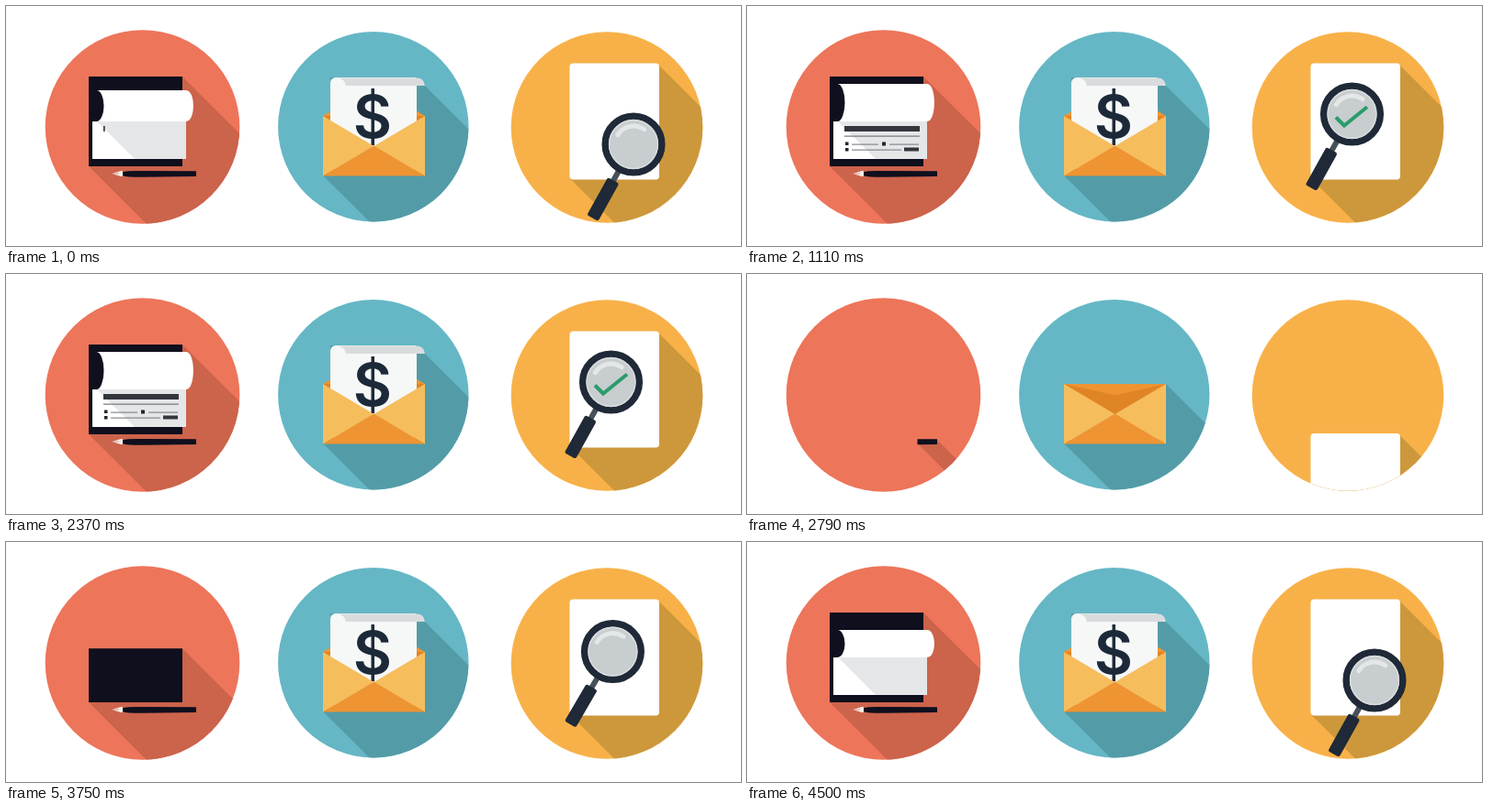
Recreate the animation shown at these times as an HTML page with a canvas. Size 800 by 262 pixels, loop 4.53 s.

```html
<!DOCTYPE html>
<html>
<head>
<meta charset="utf-8">
<style>
html, body { margin: 0; width: 100%; height: 100%; overflow: hidden; background: #fff; }
canvas { display: block; }
</style>
</head>
<body>
<canvas id="stage" width="800" height="262"></canvas>
<script>
const c = document.getElementById('stage').getContext('2d');
const LOOP = 4530, STEP = 30, START = 2580; // the build-up begins at START
const NAVY = '#1f2937', INK = '#0f0f1e';

const ramp = (t, a, b) => Math.min(1, Math.max(0, (t - a) / (b - a)));
const out = p => 1 - (1 - p) ** 2;
const inOut = p => p < .5 ? 4 * p ** 3 : 1 - 4 * (1 - p) ** 3;
const mix = (a, b, p) => a + (b - a) * p;

function rect(color, x, y, w, h, r = 0) {
  if (w <= 0 || h <= 0) return;
  c.fillStyle = color;
  c.beginPath();
  c.roundRect(x, y, w, h, r);
  c.fill();
}

function poly(color, ...p) {
  c.fillStyle = color;
  c.beginPath();
  for (let i = 0; i < p.length; i += 2) c.lineTo(p[i], p[i + 1]);
  c.fill();
}

function shape(color, d) {
  c.fillStyle = color;
  c.fill(new Path2D(d));
}

function clipped(x, y, w, h, draw) {
  c.save();
  c.beginPath();
  c.rect(x, y, w, h);
  c.clip();
  draw();
  c.restore();
}

function badge(x, y, r, color, draw) {
  c.save();
  c.beginPath();
  c.arc(x, y, r, 0, 7);
  c.fillStyle = color;
  c.fill();
  c.clip();
  draw();
  c.restore();
}

// Long 45 degree shadows of boxes [left, top, right, bottom], merged into one fill
function shadows(color, ...boxes) {
  const far = 250;
  c.fillStyle = color;
  c.beginPath();
  for (const [l, t, r, b] of boxes) {
    if (r <= l || b <= t) continue;
    c.moveTo(l, t);
    c.lineTo(r, t);
    c.lineTo(r + far, t + far);
    c.lineTo(l + far, b + far);
    c.lineTo(l, b);
    c.closePath();
  }
  c.fill();
}

function checkbook(t) {
  const penX = mix(207, 115, ramp(t, 0, 900));
  const width = 102 * ramp(t, 815, 1110);
  const top = mix(126, 77, out(ramp(t, 1110, 1680)));
  const page = 102 * ramp(t, 1548, 1740);
  const roll = 41 * out(ramp(t, 1784, 2067));

  shadows('#cc634b', [90, top, 90 + width, 175], [Math.max(penX, 122), 181, 207, 185]);
  rect(INK, 90, top, width, 175 - top);
  clipped(penX, 176, 207.5 - penX, 14, () => {
    poly('#fbeee6', 115, 183, 126, 179.8, 129, 183, 126, 186.3);
    poly('#8d5148', 116, 182.8, 123, 182.8, 123, 183.3, 116, 183.3);
    shape(INK, 'M127 181Q132 179.5 150 180L207 180.3V186L150 186.8Q132 187 127 185.3Z');
  });
  clipped(94, 126, page, 41, () => {
    rect('#e4e6e8', 94, 126, 102, 41);
    poly('#fff', 94, 126, 99, 126, 140, 167, 94, 167);
    printed(t);
  });
  if (roll > 0) {
    const y = 126 - roll;
    c.fillStyle = '#fff';
    c.beginPath();
    c.moveTo(99, y);
    c.lineTo(196, y);
    c.bezierCurveTo(206.5, y, 206.5, 126, 196, 126);
    c.lineTo(99, 126);
    c.fill();
    c.fillStyle = INK;
    c.beginPath();
    c.ellipse(98.5, 126 - roll / 2, 8, roll / 2, 0, 0, 7);
    c.fill();
  }
}

function printed(t) {
  const row = (from, to, color, x, y, w, h) => rect(color, x, y, w * ramp(t, from, to), h);
  row(1945, 2190, '#33363d', 106, 131, 82, 6);
  row(2160, 2340, '#777a80', 106, 141.5, 82, 1.3);
  row(2310, 2340, '#22252c', 107, 148.5, 3.5, 3.5);
  row(2340, 2430, '#888b90', 114, 150.5, 29, 1.3);
  row(2430, 2460, '#22252c', 147, 148.5, 4, 4);
  row(2460, 2550, '#888b90', 155, 150.5, 32, 1.3);
  row(2520, 2550, '#22252c', 107, 155, 3.5, 3.5);
  row(2550, 2670, '#888b90', 114, 156.5, 54, 1.3);
  row(2670, 2730, '#33363d', 171, 154.5, 16, 4);
}

function envelope(t) {
  const tip = mix(153, 87, inOut(ramp(t, 75, 390)));
  const lift = 78 * (1 - out(ramp(t, 390, 810)));
  const curl = ramp(t, 840, 1110);
  const flap = () => poly('#ee9432', 345, 120, 456, 120, 400.5, tip);

  shadows('#539ca7', [345, 120, 456, 185], [353, Math.min(78 + lift, 150), 447, 152]);
  if (tip < 120) flap();
  rect('#df8526', 345, 120, 111, 65);
  clipped(345, 60, 115, 124, () => {
    c.translate(0, lift);
    rect('#f6f7f7', 353, 78, 94, 100, [6, 2, 0, 0]);
    c.fillStyle = '#1c2938';
    c.font = '600 65px Inter, sans-serif';
    c.textAlign = 'center';
    c.fillText('S', 399, 143.5);
    rect('#1c2938', 397.5, 90, 3.5, 62);
    clipped(353, 77, 104 * curl, 12, () =>
      shape('#d9dcdd', 'M360 78.5H448Q455 79 456 87H370Q369 79 360 78.5Z'));
  });
  poly('#f6bd5c', 345, 120, 400.5, 153, 345, 185.5);
  poly('#f6bd5c', 456, 120, 400.5, 153, 456, 185.5);
  poly('#ee9432', 345, 185.5, 400.5, 152.5, 456, 185.5);
  if (tip >= 120) flap();
}

// Time, x, y, tilt in degrees, easing into this pose
const POSES = [
  [660, 724, 250, 55],
  [840, 692, 171, 42, p => p],
  [1320, 657, 114, 29, out],
  [1590, 657, 114, 29, out],
  [1890, 683, 151, 29, inOut],
  [1980, 683, 151, 29, inOut],
  [2370, 658.5, 118, 29, inOut]
];

function lensPose(t) {
  let pose = POSES[0].slice(1, 4);
  for (const [i, next] of POSES.entries()) {
    if (!i || t < POSES[i - 1][0]) continue;
    const prev = POSES[i - 1];
    const p = next[4](ramp(t, prev[0], next[0]));
    pose = [1, 2, 3].map(k => mix(prev[k], next[k], p));
  }
  return pose;
}

function magnifier(t) {
  const [x, y, tilt] = lensPose(t);
  c.save();
  c.translate(x, y);
  c.save();
  c.rotate(tilt * Math.PI / 180);
  rect('#47515a', -3, 32, 6, 16);
  rect(NAVY, -7, 45, 14, 47, 2.5);
  c.restore();

  c.beginPath();
  c.arc(0, 0, 30.8, 0, 7);
  c.fillStyle = '#c8cdcf';
  c.fill();
  c.lineWidth = 7.5;
  c.strokeStyle = NAVY;
  c.stroke();
  c.lineWidth = 1.5;
  c.strokeStyle = '#d9dddf';
  c.beginPath();
  c.arc(0, 0, 26.4, 0, 7);
  c.stroke();
  c.lineWidth = 5;
  c.lineCap = 'round';
  c.strokeStyle = '#e3e7e8';
  c.beginPath();
  c.arc(0, 0, 20, -2.6, -.95);
  c.stroke();

  const drawn = ramp(t, 2640, 3080);
  if (drawn > 0) {
    c.lineCap = 'butt';
    c.lineWidth = 4;
    c.strokeStyle = '#2a9d6c';
    c.setLineDash([47 * drawn, 100]);
    c.stroke(new Path2D('M-17.5 3.5L-8.5 12.5L17.5 -8.5'));
  }
  c.restore();
}

function review(t) {
  const top = mix(238, 62.5, inOut(ramp(t, 30, 430)));
  shadows('#cd983b', [614, top + 2, 710.5, top + 126]);
  rect('#fff', 613.5, top, 97.5, 127, 4);
  if (t >= 660) magnifier(t);
}

function frame(now) {
  const clock = Math.floor(now % LOOP / STEP) * STEP;
  const t = (clock - START + LOOP) % LOOP;
  c.fillStyle = '#fff';
  c.fillRect(0, 0, 800, 262);
  badge(148.5, 132, 105.8, '#ed755a', () => checkbook(t));
  badge(399.8, 131.8, 103.7, '#65b7c5', () => envelope(t));
  badge(654, 132.5, 104.3, '#f8b148', () => review(t));
}

const begin = performance.now();
(function tick() {
  frame(performance.now() - begin);
  requestAnimationFrame(tick);
})();
</script>
</body>
</html>
```
